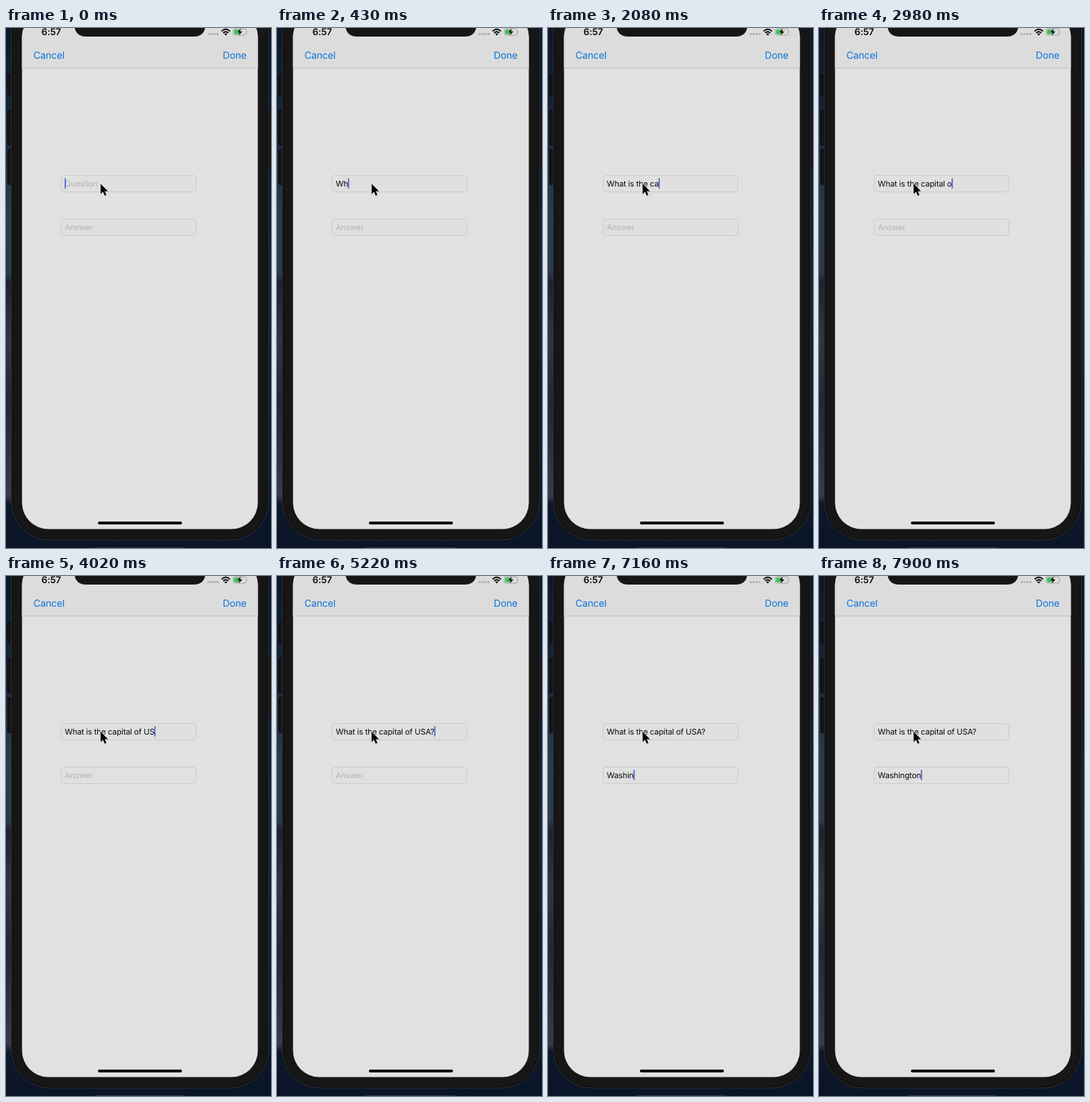
Animation of 372x728 px, one loop 8000 ms. Source, as an HTML page:

```html
<!DOCTYPE html>
<html lang="en">
<head>
<meta charset="utf-8">
<title>Question form</title>
<style>
  html, body { margin: 0; width: 100%; height: 100%; overflow: hidden; background: #0b1526; }
  svg { display: block; width: 372px; height: 728px; }
  text { font-family: Inter, Roboto, sans-serif; text-rendering: geometricPrecision; white-space: pre; }
  .nav { font-size: 13.6px; letter-spacing: -0.18px; fill: #0b74de; }
  .entry { font-size: 11.2px; letter-spacing: -0.17px; fill: #0a0a0a; }
  .hint { fill: #b4b4b6; }
  .box { fill: #e0e0e0; stroke: #cccccd; stroke-width: 1; }
  .key { fill: #141518; stroke: #07080a; stroke-width: 1; }
</style>
</head>
<body>
<svg viewBox="0 0 372 728">
  <defs>
    <linearGradient id="sky" x2="0" y2="1">
      <stop offset="0" stop-color="#0b172c"/>
      <stop offset=".15" stop-color="#14233a"/>
      <stop offset=".36" stop-color="#293c50"/>
      <stop offset=".47" stop-color="#2b3a4c"/>
      <stop offset=".49" stop-color="#1b2332"/>
      <stop offset=".6" stop-color="#303744"/>
      <stop offset=".72" stop-color="#1f2838"/>
      <stop offset=".9" stop-color="#343d4c"/>
      <stop offset=".915" stop-color="#0c1729"/>
      <stop offset="1" stop-color="#0a1528"/>
    </linearGradient>
    <linearGradient id="dusk" x2="0" y2="1">
      <stop offset="0" stop-color="#0a1528"/>
      <stop offset=".5" stop-color="#13213a"/>
      <stop offset="1" stop-color="#0a1528"/>
    </linearGradient>
  </defs>

  <rect width="190" height="728" fill="url(#sky)"/>
  <rect x="190" width="182" height="728" fill="url(#dusk)"/>
  <rect x="125" y="727" width="125" height="1" fill="#343b48"/>

  <g class="key">
    <rect x="2.5" y="65.5" width="8" height="28" rx="1.5"/>
    <rect x="2.5" y="115" width="8" height="49" rx="1.5"/>
    <rect x="2.5" y="170" width="8" height="49" rx="1.5"/>
    <rect x="364" y="115" width="9" height="81" rx="1.5"/>
  </g>
  <rect x="7.5" y="-60" width="361" height="777" rx="54" fill="#161617" stroke="#2b2c2e"/>
  <rect x="9.5" y="-58" width="357" height="773" rx="52" fill="none" stroke="#0e0e0f"/>

  <rect x="22.5" y="-24" width="331" height="725.5" rx="37" fill="#e1e1e1"/>
  <path d="M22.5 56V13Q22.5 5 25 0H351Q353.5 5 353.5 13V56Z" fill="#dcdcdc"/>
  <rect x="22.5" y="55.5" width="331" height="1" fill="#bcbcbd"/>
  <path d="M96.5 0C98 8 104 12 112 12H264C272 12 278 8 279.5 0Z" fill="#161617"/>

  <text x="49.7" y="10" font-size="13" font-weight="600" letter-spacing="-.1" fill="#0a0a0a">6:57</text>
  <g id="signal" fill="#a9a9aa"></g>
  <g fill="none" stroke="#0a0a0a" stroke-width="1.9">
    <path d="M302.6 4.6Q308.5 -.9 314.4 4.6"/>
    <path d="M304.9 7Q308.5 3.7 312.1 7"/>
  </g>
  <path d="M306.4 8.4Q308.5 6.6 310.6 8.4L308.5 10.5Z" fill="#0a0a0a"/>
  <rect x="319" y="1" width="18.4" height="9" rx="2.6" fill="none" stroke="#9b9b9c" stroke-width=".9"/>
  <path d="M338.6 4V7.2Q339.8 5.6 338.6 4Z" fill="#9b9b9c"/>
  <rect x="320.3" y="2.3" width="8.2" height="6.4" rx="1.4" fill="#35c553"/>
  <path d="M329.7 .4L324.4 6.2H327.8L326.7 10.6L332 4.8H328.6Z" fill="#0a0a0a" stroke="#dcdcdc" stroke-width=".7" paint-order="stroke"/>

  <text class="nav" x="38.5" y="43">Cancel</text>
  <text class="nav" x="337.5" y="43" text-anchor="end">Done</text>

  <rect class="box" x="77.5" y="206.5" width="189" height="23" rx="3.6"/>
  <rect class="box" x="77.5" y="267.5" width="189" height="23" rx="3.6"/>
  <text class="entry" id="question" x="82.6" y="221.7"></text>
  <text class="entry" id="answer" x="82.6" y="282.7"></text>
  <rect id="caret" width="1.6" height="14.6" rx=".6" fill="#425fd6"/>

  <rect x="129" y="690.9" width="118" height="4" rx="2" fill="#050505"/>

  <path d="M133 219V233.8L136.4 230.7L138.9 236.2L141.4 235.1L139 229.8H143.9Z" fill="#000" opacity=".15"/>
  <path d="M132.8 217.9V232.4L136.1 229.3L138.5 234.7L141 233.6L138.6 228.4H143.2Z" fill="#050505" stroke="#f4f4f4" stroke-width="1.1" stroke-linejoin="round" paint-order="stroke"/>
</svg>
<script>
const LOOP = 8000;
const FOCUS = 5370;
const PAUSES = [[1780, 1930], [5970, 6120]];

// Each step: start time, text in the field from then on
const QUESTION = [
  [0, ""], [140, "W"], [290, "Wh"], [440, "What"], [590, "What "],
  [740, "What is"], [880, "What ist"], [1030, "What isthe"],
  [1180, "What is the"], [1330, "What is the "],
  [1930, "What is the c"], [2080, "What is the ca"], [2230, "What is the cap"],
  [2380, "What is the capit"], [2680, "What is the capita"],
  [2830, "What is the capital "], [2980, "What is the capital o"],
  [3280, "What is the capital of"], [3420, "What is the capital of "],
  [4020, "What is the capital of US"], [4620, "What is the capital of USA"],
  [5220, "What is the capital of USA?"]
];
const CITY = "Washington";
const CITY_TIMES = [6120, 6420, 6570, 6710, 7010, 7160, 7310, 7610, 7760, 7900];
const ANSWER = [[0, ""], ...CITY_TIMES.map((t, i) => [t, CITY.slice(0, i + 1)])];

const el = id => document.getElementById(id);
const question = el("question"), answer = el("answer"), caret = el("caret");

el("signal").innerHTML = [0, 1, 2, 3]
  .map(i => `<circle cx="${284.6 + i * 4.1}" cy="8.4" r="1.5"/>`).join("");

function textAt(steps, t) {
  let text = "";
  for (const [start, value] of steps) if (t >= start) text = value;
  return text;
}

function fill(node, text, hint) {
  const shown = text || hint;
  if (node.textContent !== shown) node.textContent = shown;
  node.classList.toggle("hint", !text);
}

function render(t) {
  const q = textAt(QUESTION, t), a = textAt(ANSWER, t);
  fill(question, q, "Question");
  fill(answer, a, "Answer");
  const onAnswer = t >= FOCUS;
  const node = onAnswer ? answer : question;
  const typed = onAnswer ? a : q;
  const width = typed ? node.getSubStringLength(0, typed.length) : 0;
  caret.setAttribute("x", 82.4 + width);
  caret.setAttribute("y", onAnswer ? 271.2 : 210.2);
  const hidden = PAUSES.some(([from, to]) => t >= from && t < to);
  caret.setAttribute("visibility", hidden ? "hidden" : "visible");
}

const begin = performance.now();
function tick() {
  render((performance.now() - begin) % LOOP);
  requestAnimationFrame(tick);
}
render(0);
requestAnimationFrame(tick);
</script>
</body>
</html>
```
